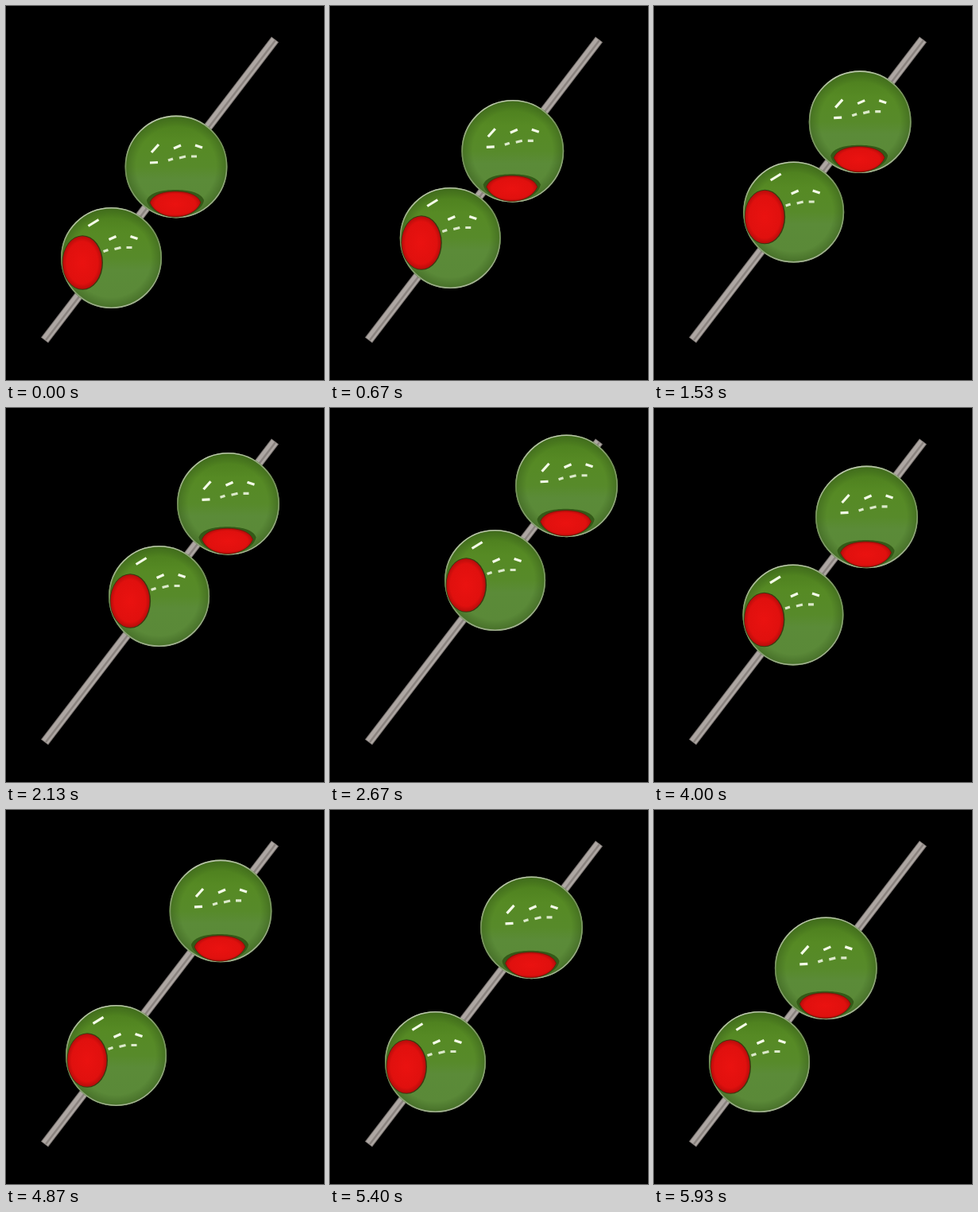
An HTML page for the animation above (6000 ms loop, 400x470 px).

```html
<!DOCTYPE html>
<html lang="en">
<head>
<meta charset="utf-8">
<title>Olives on a pick</title>
<style>
  html, body { margin: 0; width: 100%; height: 100%; overflow: hidden; background: #000; }
  svg { display: block; width: 400px; height: 470px; }
  .shine { fill: none; stroke: #f4fbe8; stroke-width: 3.2; }
</style>
</head>
<body>
<svg viewBox="0 0 400 470">
  <defs>
    <linearGradient id="skin" x1="0" y1="0" x2="0" y2="1">
      <stop offset="0" stop-color="#4a7c1c"/>
      <stop offset=".25" stop-color="#568a24"/>
      <stop offset=".5" stop-color="#578a2a"/>
      <stop offset=".62" stop-color="#5b8b38"/>
      <stop offset="1" stop-color="#5a8838"/>
    </linearGradient>
    <radialGradient id="edge" cx=".5" cy=".5" r=".5">
      <stop offset=".78" stop-color="#34581a" stop-opacity="0"/>
      <stop offset=".95" stop-color="#34581a" stop-opacity=".4"/>
      <stop offset="1" stop-color="#34581a" stop-opacity=".5"/>
    </radialGradient>
    <linearGradient id="rim" x1=".3" y1="0" x2=".6" y2="1">
      <stop offset="0" stop-color="#c3ccb6"/>
      <stop offset=".4" stop-color="#75905a"/>
      <stop offset=".65" stop-color="#7f9a68"/>
      <stop offset="1" stop-color="#a5b295"/>
    </linearGradient>
    <radialGradient id="red">
      <stop offset="0" stop-color="#ea1210"/>
      <stop offset=".8" stop-color="#e0100e"/>
      <stop offset="1" stop-color="#b80c0a"/>
    </radialGradient>
    <g id="ball">
      <circle r="64" fill="url(#skin)"/>
      <circle r="64" fill="url(#edge)"/>
      <circle r="63.200" fill="none" stroke="url(#rim)" stroke-width="1.600"/>
    </g>
    <g id="lamps" class="shine">
      <path d="M-3-23L6-27M24-27L33-24"/>
      <path d="M-10-8L-4-10M4-11L12-13M19-13L26-13" opacity=".85"/>
    </g>
  </defs>

  <rect width="400" height="470"/>

  <g fill="none">
    <path id="stick" d="M48.500 420L338.500 42" stroke="#77716e" stroke-width="11.500"/>
    <path d="M49 419.400L338 42.700" stroke="#aea7a3" stroke-width="9.500"/>
    <path d="M50 420L339 43" stroke="#8b8480" stroke-width="2.500"/>
  </g>

  <g id="low">
    <use href="#ball" transform="scale(.992)"/>
    <ellipse cx="-36.200" cy="6" rx="25.700" ry="34.300" fill="#3a3a10"/>
    <ellipse cx="-36.500" cy="6" rx="24.600" ry="33.200" fill="url(#red)"/>
    <use href="#lamps"/>
    <path class="shine" d="M-29-40L-16-48"/>
  </g>

  <g id="top">
    <use href="#ball" transform="scale(1.006)"/>
    <path d="M-37 42C-33 32-17 29-1 29S31 32 35 42C34 54 14 63.500-1 63.500S-36 54-37 42Z" fill="#345a18"/>
    <path d="M-33 45C-29 34-14 31-1 31S27 34 31 45C26 57 12 63-1 63S-28 57-33 45Z" fill="url(#red)" stroke="#6d1a0a" stroke-width=".8"/>
    <use href="#lamps"/>
    <path class="shine" d="M-31-18L-22-28"/>
    <path class="shine" d="M-33-5L-23-5.500" stroke-width="5"/>
  </g>
</svg>
<script>
const LOOP = 6000, STEP = LOOP / 90;

// Turning points: time, x, y; straight, even motion in between
const paths = {
  top: [[200, 214, 202], [3300, 319, 71], [4218, 251.5, 157.5], [5078, 276, 117], [5966, 214, 202]],
  low: [[0, 132.5, 316.5], [3000, 217, 204], [5010, 132.5, 316.5]]
};

function position(path, t) {
  const next = path.findIndex(p => p[0] > t);
  if (next < 1) return path[0].slice(1);
  const [t0, x0, y0] = path[next - 1], [t1, x1, y1] = path[next];
  const u = (t - t0) / (t1 - t0);
  return [x0 + (x1 - x0) * u, y0 + (y1 - y0) * u];
}

function draw() {
  const step = Math.floor((performance.now() + 4) / STEP);
  const t = step * STEP % LOOP;
  for (const id in paths) {
    const [x, y] = position(paths[id], t);
    document.getElementById(id).setAttribute("transform", `translate(${x} ${y})`);
  }
  requestAnimationFrame(draw);
}
draw();
</script>
</body>
</html>
```
